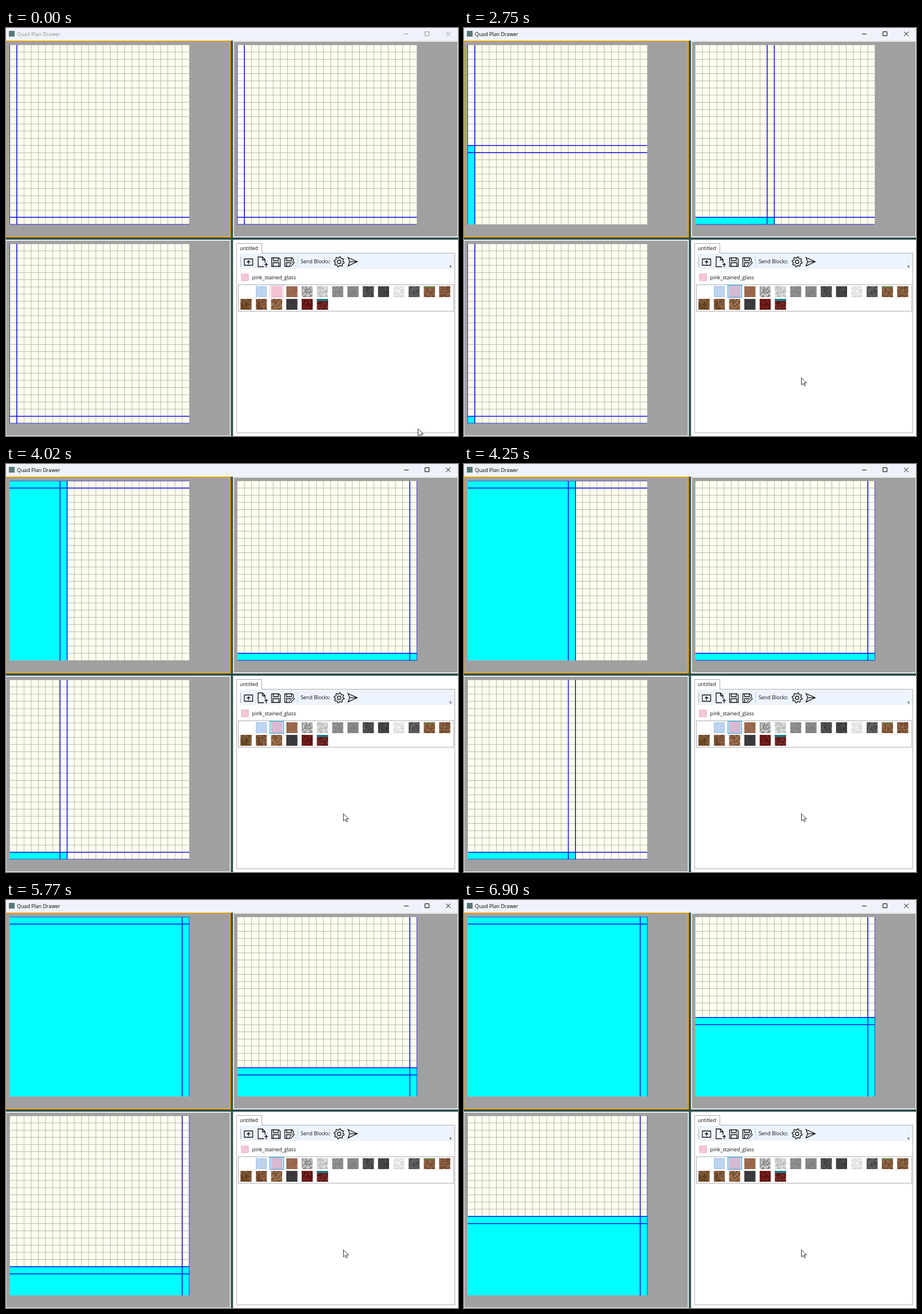
An HTML page with a canvas that plays this animation: 787 px wide and 711 px high, repeating every 8000 ms.

```html
<!DOCTYPE html>
<html lang="en">
<head>
<meta charset="utf-8">
<title>Block planner</title>
<style>
  html, body { margin: 0; width: 100%; height: 100%; overflow: hidden; }
  canvas { display: block; }
</style>
</head>
<body>
<canvas id="stage" width="787" height="711"></canvas>
<script>
const ctx = document.getElementById('stage').getContext('2d');
const LOOP = 8000, CELLS = 25, CELL = 12.52, SIZE = CELLS * CELL;

// [time, value] steps of the cursor planes; rise is a list of single steps up
const depthSteps = [[1990, 1], [2520, 4], [2640, 7], [2750, 10], [2890, 13], [3010, 17], [3130, 21], [3260, 24]];
const columnSteps = [[3360, 1], [3880, 3], [4020, 7], [4140, 10], [4250, 14], [4380, 17], [4510, 21], [4640, 24]];
const riseTimes = [5370, 5490, 5770, 5870, 6000, 6140, 6370, 6500, 6630, 6900];
const valueAt = (steps, t) => steps.reduce((v, [time, next]) => t >= time ? next : v, 0);

// base colour, speckle strength, optional colour of the top edge
const blocks = [
  ['#99694f', 8], ['#b0b0b0', 60], ['#cccccc', 30], ['#8b8b8b', 14], ['#858585', 10],
  ['#4b4b4c', 22], ['#414143', 20], ['#e6e6e6', 22], ['#5b5b5c', 24],
  ['#82583c', 28, '#747543'], ['#82583c', 28], ['#76512f', 28], ['#7d563a', 30],
  ['#8d6444', 30], ['#3b3b3e', 8], ['#651713', 20], ['#6b2423', 24, '#168087']
];

function box(x, y, w, h, fill, stroke) {
  if (fill) { ctx.fillStyle = fill; ctx.fillRect(x, y, w, h); }
  if (stroke) { ctx.strokeStyle = stroke; ctx.lineWidth = 1; ctx.strokeRect(x + .5, y + .5, w - 1, h - 1); }
}

function text(label, x, y, color = '#111') {
  ctx.font = '8.85px "Open Sans", "Noto Sans", sans-serif';
  ctx.fillStyle = color;
  ctx.fillText(label, x, y);
}

function shape(d, stroke = '#111', width = 1.3, fill) {
  const path = new Path2D(d);
  if (fill) { ctx.fillStyle = fill; ctx.fill(path); }
  ctx.strokeStyle = stroke;
  ctx.lineWidth = width;
  ctx.stroke(path);
}

function titleBar(active) {
  const ink = active ? '#000' : '#929497';
  box(0, 0, 787, 22.2, '#eff3f9');
  box(5, 5, 10, 10, '#587a7c');
  text('Quad Plan Drawer', 19, 13.5, ink);
  shape('M693 10.5h8M729.5 6.5h7v7h-7zM766 6.3l8 8m0-8l-8 8', ink, 1);
}

function frame(x, y, color) {
  const w = 392.4, h = 342.8, border = 1.6;
  box(x, y, w, h, color);
  box(x + border, y + border, w - 2 * border, h - 2 * border, '#a0a0a0');
}

// One projection: column and row counted from the lower left corner
function plane(x, y, col, row, filled) {
  const bottom = y + SIZE;
  const vertical = (i, w, color) => box(x + i * CELL - w / 2, y, w, SIZE, color);
  const horizontal = (i, w, color) => box(x, bottom - i * CELL - w / 2, SIZE, w, color);

  ctx.save();
  ctx.beginPath();
  ctx.rect(x, y, SIZE, SIZE);
  ctx.clip();
  box(x, y, SIZE, SIZE, '#fffff0');
  for (let i = 0; i <= CELLS; i++) {
    vertical(i, .8, '#a6a6a2');
    horizontal(i, .8, '#a6a6a2');
  }
  if (filled) {
    const h = (row + 1) * CELL;
    box(x, bottom - h, (col + 1) * CELL, h, '#00ffff');
  }
  for (const i of [0, 1]) {
    vertical(col + i, 1.4, '#0000e4');
    horizontal(row + i, 1.4, '#0000e4');
  }
  ctx.restore();
}

function blockTile(x, y, [color, strength, top], seed) {
  const rgb = [1, 3, 5].map(i => parseInt(color.slice(i, i + 2), 16));
  const n = 8, s = 19 / n;
  box(x, y, 19, 19, color);
  for (let i = 0; i < n * n; i++) {
    seed = (seed * 16807) % 2147483647;
    const shift = (seed / 2147483647 - .5) * 2 * strength;
    box(x + i % n * s, y + Math.floor(i / n) * s, s, s, `rgb(${rgb.map(c => c + shift)})`);
  }
  if (top) box(x, y, 19, 3.5, top);
}

function toolbar() {
  box(406, 393, 375, 27, '#edf4fd');
  for (let y = 399; y < 416; y += 3) box(408, y, 1.3, 1.3, '#777');
  shape('M415 402.5h14.5v11h-14.5zM415 402.5h5M422.3 411.5v-5.5M419.5 408.5l2.8-2.8 2.8 2.8');
  shape('M451 409v-5.5l-4.5-4.5h-7.5v17h10M446.5 399v5h4.5M453 417v-6.5M450.5 413l2.5-2.7 2.5 2.7');
  shape('M462.5 400.5h12.5l2.5 2.5v12.5h-15zm3 0v5h8.5v-5m-9 15v-6.5h10v6.5');
  shape('M492 415.5h-6.5v-15h12.5l2.5 2.5v3M488.5 400.5v5h8.5v-5M488.5 415.5v-6.5h7.5');
  shape('M493 416l1-3.3 6-6 2.2 2.2-6 6z', '#111', 1.1, '#edf4fd');
  box(507, 397, 1, 20, '#c8d0da');
  text('Send Blocks:', 513, 410);

  let gear = '';
  for (let i = 0; i < 32; i++) {
    const a = (i + .5) * Math.PI / 16, r = i % 4 < 2 ? 8.8 : 6.7;
    gear += `${i ? 'L' : 'M'}${580 + r * Math.cos(a)} ${407.5 + r * Math.sin(a)}`;
  }
  shape(gear + 'ZM583 407.5a3 3 0 1 0-6 0a3 3 0 1 0 6 0');
  shape('M595.5 400l16 7.3-16 7.4 3-7.4zM598.5 407.3h13');
  box(772, 414, 4, .8, '#333');
  shape('M772.8 416.3h2.4l-1.2 1.2z', '#333', .5, '#333');
}

function palette(active) {
  box(395.3, 368.9, 392, 343, '#fff');
  box(401, 392, 381, 314, '#fff', '#acacac');
  box(401, 375, 45, 18, '#fff', '#acacac');
  box(402, 391, 43, 3, '#fff');
  text('untitled', 407, 387);
  toolbar();

  box(409.5, 428, 13, 13, '#f5c6d5', '#edb4c6');
  text('pink_stained_glass', 428.5, 437.5);
  box(404, 447, 376, 47, '#fff', '#abadb3');
  box(435, 450, 19, 19, '#bcd4f1', '#a5c6ed');
  box(459, 448, 25, 22, active ? '#cbe8f6' : '#f6f6f6', active ? '#26a0da' : '#dadada');
  box(462, 450, 19, 19, active ? '#d8b9d2' : '#f4c2d4', active ? '#cfacca' : '#eeb2c8');
  blocks.forEach((block, i) => {
    const slot = i + 3;
    blockTile(408.5 + slot % 14 * 26.6, slot < 14 ? 450 : 472, block, 7919 * slot);
  });
}

function pointer(x, y) {
  shape(`M${x + .5} ${y + .5}v12.5l3-2.7 2 4.5 2-.9-2-4.4h4z`, '#222', .9, '#fff');
}

function draw(t) {
  const active = t >= 380, filled = t >= 1620;
  const depth = valueAt(depthSteps, t);
  const column = valueAt(columnSteps, t);
  const height = riseTimes.filter(time => t >= time).length;

  box(0, 0, 787, 711, '#2f4f4f');
  titleBar(active);
  frame(-1, 22.2, '#ffa500');
  frame(395.3, 22.2, '#fff');
  frame(-1, 368.9, '#fff');
  plane(6.3, 29.4, column, depth, filled);
  plane(402.6, 29.4, depth, height, filled);
  plane(6.3, 376.1, column, height, filled);
  palette(active);
  t < 130 ? pointer(717, 698) : pointer(587, 609);
}

function tick() {
  draw(performance.now() % LOOP);
  requestAnimationFrame(tick);
}
tick();
</script>
</body>
</html>
```
